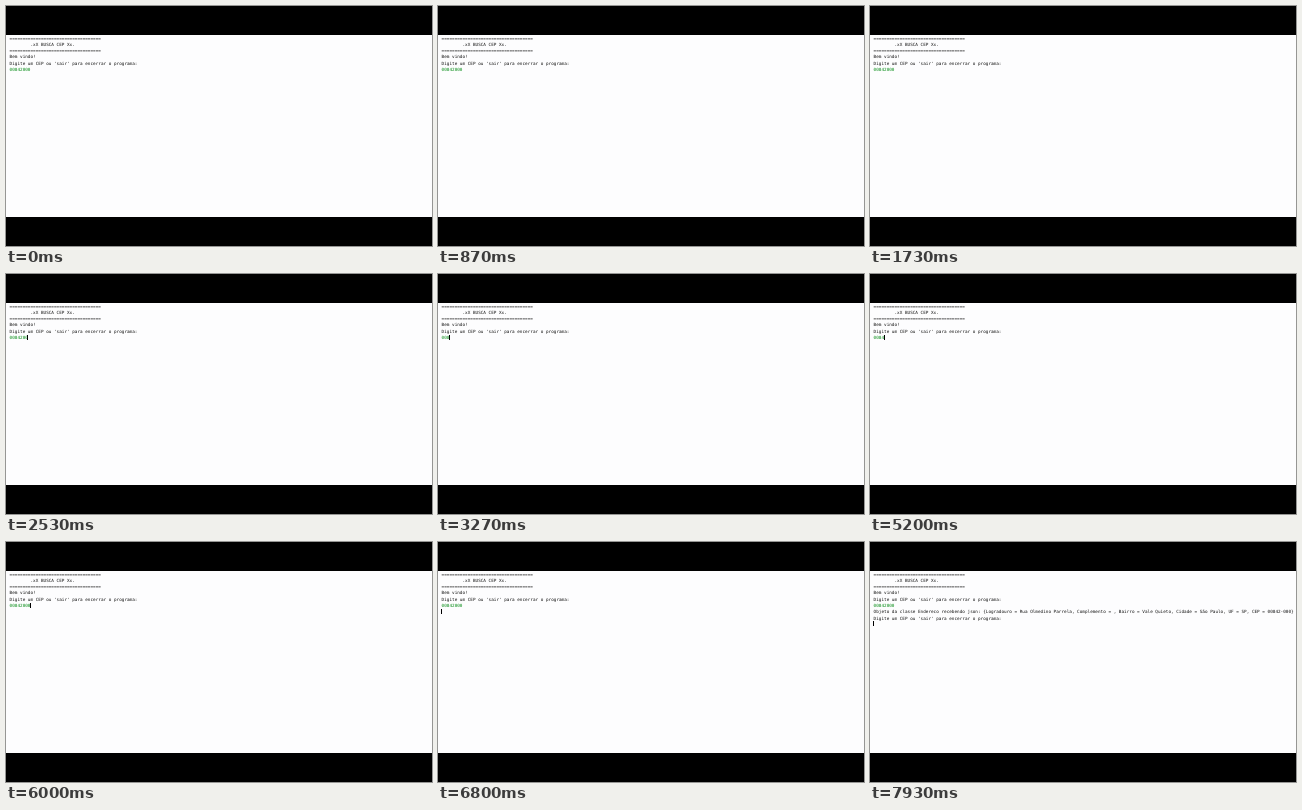
Write an HTML page with a canvas that moves like this. It is 426 by 240 pixels and loops after 8000 ms.

```html
<!DOCTYPE html>
<html lang="pt-BR">
<head>
<meta charset="utf-8">
<title>Busca CEP</title>
<style>
  html, body { margin: 0; width: 100%; height: 100%; overflow: hidden; background: #000; }
  canvas { display: block; width: 100vw; height: 100vh; }
</style>
</head>
<body>
<canvas id="stage" width="426" height="240"></canvas>
<script>
const ctx = document.getElementById('stage').getContext('2d');

const LOOP = 8000, BLINK = 500;
const LEFT = 3.6, ADVANCE = 2.609, BASELINE = 33.5, LINE = 6.3;
const INK = '#111', INPUT = '#008a12';
const FONT_SCALE = 0.1;

const CODE = '00842000';
const PROMPT = "Digite um CEP ou 'sair' para encerrar o programa:";
const RULE = '='.repeat(35);
const HEADER = [RULE, ' '.repeat(8) + '.xX BUSCA CEP Xx.', RULE, 'Bem vindo!', PROMPT];
const RESULT = 'Objeto da classe Endereco recebendo json: {Logradouro = Rua Olmedino Parrela, ' +
  'Complemento = , Bairro = Vale Quieto, Cidade = São Paulo, UF = SP, CEP = 00842-000}';

// Each event: time, digits in the input, caret row
const events = [{ time: 200, digits: 8, row: 5 }];
for (let i = 0; i < 8; i++) events.push({ time: 2450 + i * 180, digits: 7 - i, row: 5 });
for (let i = 0; i < 8; i++) events.push({ time: 4550 + i * 200, digits: i + 1, row: 5 });
events.push({ time: 6400, digits: 8, row: 6 }, { time: 7500, digits: 8, row: 8 });

function drawLine(text, row, color) {
  ctx.save();
  ctx.translate(LEFT, BASELINE + row * LINE);
  ctx.scale(FONT_SCALE, FONT_SCALE);
  ctx.font = '43.4px "DejaVu Sans Mono", monospace';
  ctx.textRendering = 'geometricPrecision';
  ctx.fillStyle = color;
  [...text].forEach((char, i) => ctx.fillText(char, i * ADVANCE / FONT_SCALE, 0));
  ctx.restore();
}

function draw(t) {
  const state = events.findLast(e => e.time <= t) || events[0];

  ctx.fillStyle = '#000';
  ctx.fillRect(0, 0, 426, 240);
  ctx.fillStyle = '#fdfdfe';
  ctx.fillRect(0, 29, 426, 182);

  HEADER.forEach((text, row) => drawLine(text, row, INK));
  drawLine(CODE.slice(0, state.digits), 5, INPUT);
  if (state.row === 8) {
    drawLine(RESULT, 6, INK);
    drawLine(PROMPT, 7, INK);
  }

  // The blink restarts with every key press
  if (Math.floor((t - state.time) / BLINK) % 2 === 0) {
    const column = state.row === 5 ? state.digits : 0;
    ctx.fillStyle = '#000';
    ctx.fillRect(Math.round(LEFT + column * ADVANCE - 0.4), Math.round(29 + state.row * LINE), 1, 5);
  }
}

let start;
function tick(now) {
  start ??= now;
  draw((now - start) % LOOP);
  requestAnimationFrame(tick);
}
requestAnimationFrame(tick);
</script>
</body>
</html>
```
